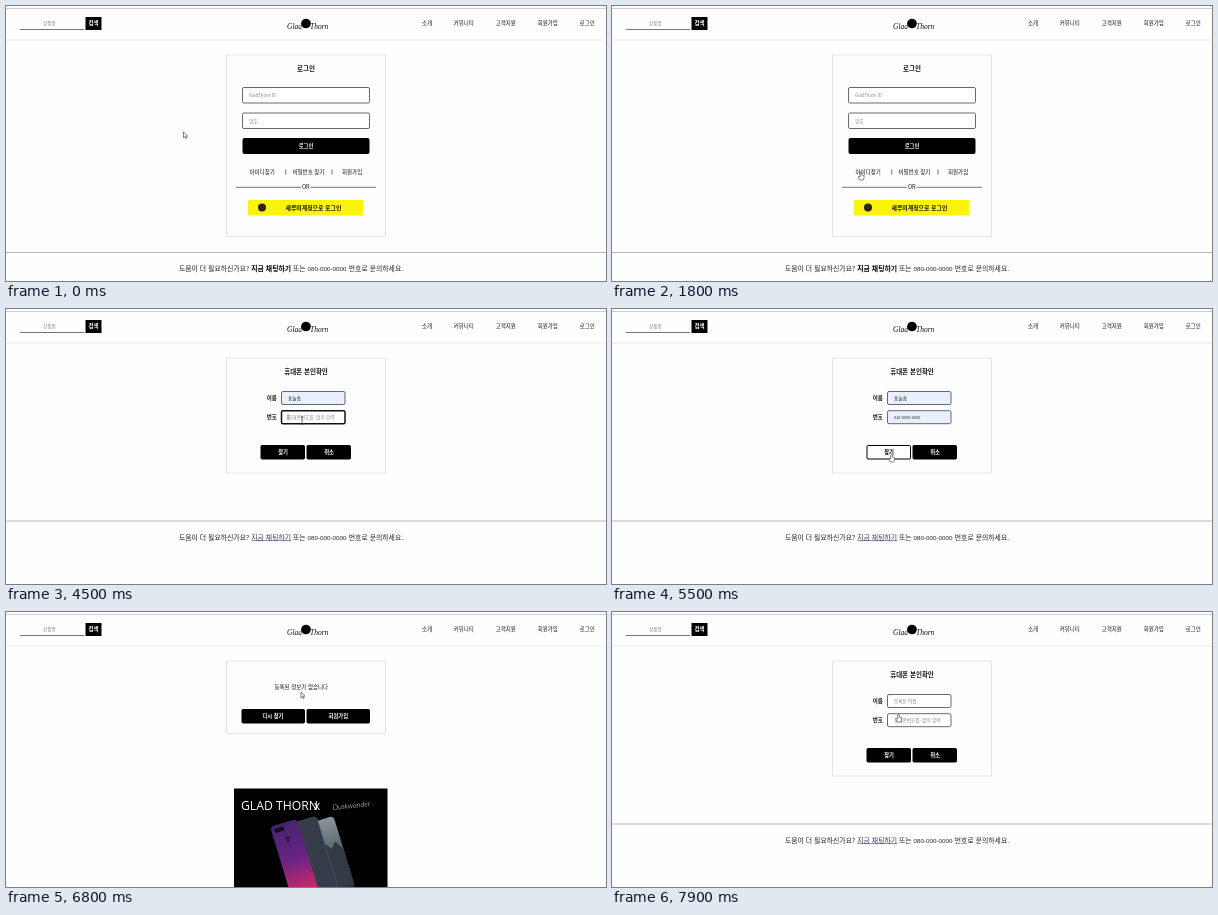
An HTML page for the animation above (8000 ms loop, 600 by 275 pixels).

```html
<!DOCTYPE html>
<html lang="ko">
<head>
<meta charset="utf-8">
<title>Login</title>
<style>
html, body { margin: 0; height: 100%; overflow: hidden; background: #fefefe; }
svg { display: block; width: 100vw; height: 100vh; }
text { font: 500 5.5px "Noto Sans CJK KR", "Noto Sans CJK", "Noto Sans CJK JP", sans-serif; fill: #111; }
.mid { text-anchor: middle; }
.bold { font-weight: 700; }
.title { font-size: 6.5px; font-weight: 700; text-anchor: middle; }
.hint { font-size: 4.6px; font-weight: 400; fill: #858585; }
.value { font-size: 4.7px; font-weight: 400; fill: #222; }
.help text { font-size: 6.87px; font-weight: 400; fill: #222; }
.help .num { font-family: "Liberation Sans", Arial, sans-serif; font-size: 6.26px; }
.logo { font: italic 7.5px "Liberation Serif", serif; }
.card { fill: #fdfdfd; stroke: #dedee2; stroke-width: .8; }
.field { fill: #fff; stroke: #444; stroke-width: .8; }
.field.filled { fill: #e8f0fe; }
.field.focus { stroke: #111; stroke-width: 1.5; }
.btn rect { fill: #000; stroke: #000; }
.btn text { fill: #fff; font-size: 5.3px; text-anchor: middle; font-weight: 700; }
.btn.hover rect { fill: #fff; }
.btn.hover text { fill: #000; }
.ad text { fill: #fff; }
.pointer { fill: #fff; stroke: #333; stroke-width: .6; stroke-linejoin: round; }
</style>
</head>
<body>
<svg viewBox="0 0 600 275" preserveAspectRatio="none">
  <defs>
    <linearGradient id="violet" x2="0" y2="1">
      <stop stop-color="#45256f"/><stop offset=".5" stop-color="#6a2385"/><stop offset="1" stop-color="#d62a68"/>
    </linearGradient>
    <linearGradient id="slate" x2="0" y2="1">
      <stop stop-color="#8b9499"/><stop offset=".45" stop-color="#59646c"/><stop offset="1" stop-color="#252b32"/>
    </linearGradient>
  </defs>

  <g id="header">
    <path d="M0 2.5H600" stroke="#d2ccd2"/>
    <path d="M0 34H600" stroke="#ececee"/>
    <path d="M14 23.5H78" stroke="#666" stroke-width=".9"/>
    <text class="hint" x="37" y="19.3" font-size="4.8">상품명</text>
    <rect x="79.5" y="11" width="16" height="13"/>
    <text class="mid bold" x="87.5" y="19.4" style="fill:#fff">검색</text>
    <text class="logo" x="296" y="23" text-anchor="end">Glad</text>
    <circle cx="300" cy="17.5" r="4.8"/>
    <text class="logo" x="304" y="23">Thorn</text>
    <text x="416" y="19.3">소개</text>
    <text x="447.7" y="19.3">커뮤니티</text>
    <text x="489.7" y="19.3">고객지원</text>
    <text x="531.7" y="19.3">회원가입</text>
    <text x="573.7" y="19.3">로그인</text>
  </g>

  <g id="login">
    <rect class="card" x="220.5" y="49" width="159" height="181.5"/>
    <text class="title" x="300" y="65">로그인</text>
    <rect class="field" x="236.5" y="81.5" width="127" height="15.5" rx="1.5"/>
    <text class="hint" x="243" y="91" style="font-size:4.3px">GladThorn ID</text>
    <rect class="field" x="236.5" y="107" width="127" height="15.5" rx="1.5"/>
    <text class="hint" x="243" y="116.5">암호</text>
    <g class="btn"><rect x="237" y="132.5" width="126" height="15" rx="1.2"/><text x="300" y="142">로그인</text></g>
    <text x="243.5" y="168">아이디찾기</text>
    <text x="286.5" y="168">비밀번호 찾기</text>
    <text x="336" y="168">회원가입</text>
    <path d="M279.8 163.5V168.5M326 163.5V168.5" stroke="#333" stroke-width=".7"/>
    <path d="M230 181.3H295M304.5 181.3H370" stroke="#555" stroke-width=".8"/>
    <text class="mid" x="299.8" y="183.2" style="font-weight:400">OR</text>
    <rect x="242" y="194" width="115.5" height="15.5" rx="1.5" fill="#fcf30a"/>
    <circle cx="256" cy="201.5" r="4" fill="#2f2114"/>
    <text class="bold" x="279.5" y="203.7" style="font-size:5.9px">새루미계정으로 로그인</text>
    <path d="M0 246.5H600" stroke="#bcb0bc"/>
    <g class="help">
      <text x="173" y="265">도움이 더 필요하신가요?</text>
      <text x="245.3" y="265" style="font-weight:700;fill:#000">지금 채팅하기</text>
      <text x="287" y="265">또는</text>
      <text class="num" x="301.5" y="265">080-000-0000</text>
      <text x="342.8" y="265">번호로 문의하세요.</text>
    </g>
  </g>

  <g id="form">
    <rect class="card" x="220.5" y="49" width="159" height="115"/>
    <text class="title" x="300" y="65">휴대폰 본인확인</text>
    <text class="bold" x="260.8" y="91">이름</text>
    <rect class="field" id="nameBox" x="275.5" y="82.5" width="63.5" height="13" rx="1.5"/>
    <text id="name" x="282" y="90.8"></text>
    <text class="bold" x="260.8" y="109.8">번호</text>
    <rect class="field" id="phoneBox" x="275.5" y="101.7" width="63.5" height="13" rx="1.5"/>
    <text id="phone" x="282" y="109.8"></text>
    <path id="caret" d="M282 105.3V111" stroke="#111" stroke-width=".6"/>
    <g class="btn" id="find"><rect x="255" y="136.5" width="43.5" height="13.5" rx="1"/><text x="277" y="145.2">찾기</text></g>
    <g class="btn"><rect x="301" y="136.5" width="43.5" height="13.5" rx="1"/><text x="323" y="145.2">취소</text></g>
    <path d="M0 212H600" stroke="#bbb" stroke-width="1.2"/>
    <g class="help">
      <text x="173" y="230.5">도움이 더 필요하신가요?</text>
      <text x="245.3" y="230.5" style="fill:#3a3468">지금 채팅하기</text>
      <path d="M245.3 231.6H285" stroke="#3a3468" stroke-width=".6"/>
      <text x="287" y="230.5">또는</text>
      <text class="num" x="301.5" y="230.5">080-000-0000</text>
      <text x="342.8" y="230.5">번호로 문의하세요.</text>
    </g>
  </g>

  <g id="result">
    <rect class="card" x="220.5" y="49" width="159" height="72.5"/>
    <text class="mid" x="295.3" y="76.5">등록된 정보가 없습니다</text>
    <g class="btn" id="again"><rect x="236" y="97.5" width="62.5" height="13.5" rx="1"/><text x="267" y="106.2">다시 찾기</text></g>
    <g class="btn"><rect x="301" y="97.5" width="62.5" height="13.5" rx="1"/><text x="332.3" y="106.2">회원가입</text></g>
    <g class="ad">
      <rect x="228" y="176.5" width="153.5" height="99"/>
      <text x="235" y="197.7" style="font:400 12.2px 'Open Sans',sans-serif">GLAD THORN</text>
      <text x="311" y="197.7" class="mid" style="font:400 12.5px 'Open Sans',sans-serif">x</text>
      <text x="327" y="198" transform="rotate(-6 327 198)" style="font:italic 300 7.4px Lato,sans-serif">Duskwander</text>
      <g transform="translate(314 208) rotate(-17)">
        <rect x="-13" y="0" width="27" height="75" rx="4" fill="url(#slate)"/>
        <path d="M-13 36L-4 22 3 31 8 25 14 34V71H-13Z" fill="#323b43"/>
      </g>
      <rect x="-12" width="25" height="75" rx="4" fill="#343d49" stroke="#59636e" stroke-width=".5" transform="translate(298 208) rotate(-17)"/>
      <g transform="translate(277 211) rotate(-17)">
        <rect x="-13.5" width="28" height="75" rx="4" fill="url(#violet)"/>
        <rect x="-10.5" y="3" width="10" height="4.5" rx="2.2" fill="#150d22"/>
        <circle cx="0" cy="17" r="2.6" fill="#2c1748"/>
      </g>
    </g>
  </g>

  <g id="cursor">
    <path class="pointer" id="arrow" d="M0 0V5.8L1.4 4.6 2.3 6.6 3.2 6.2 2.3 4.2H4Z"/>
    <path class="pointer" id="hand" d="M-.8 .7Q0 -.4 .8 .7V3L3 3.6V6L2.2 8H-1.2L-2.9 4.9Q-2 4 -.8 5Z"/>
    <path id="beam" d="M-1.2 0H1.2M0 0V7M-1.2 7H1.2" stroke="#333" stroke-width=".7"/>
  </g>
</svg>

<script>
const $ = id => document.getElementById(id);
const LOOP = 8000, STEP = 100;

// time, x, y, pointer shape from then on
const path = [
  [0, 177.5, 126, 'arrow'], [900, 200, 140, 'arrow'], [1600, 246, 165, 'hand'],
  [1800, 249, 166, 'hand'], [2000, 252, 163, 'arrow'], [2300, 287, 88, 'beam'],
  [2600, 290.5, 101, 'arrow'], [2800, 290.5, 101, 'arrow'], [3100, 290, 111, 'arrow'],
  [4000, 290, 111, 'arrow'], [4300, 296, 108, 'beam'], [4500, 296, 108, 'beam'],
  [4800, 296, 120, 'arrow'], [5000, 295, 121, 'arrow'], [5300, 281, 143, 'hand'],
  [5500, 279.5, 145, 'hand'], [5700, 279.5, 145, 'arrow'], [6000, 285, 110, 'hand'],
  [6200, 289, 96, 'arrow'], [6600, 295, 80, 'arrow'], [6900, 295, 80, 'arrow'],
  [7200, 288, 98, 'hand'], [7400, 286.5, 102, 'hand'], [8000, 286.5, 102, 'hand']
];

const show = (id, on) => $(id).style.display = on ? '' : 'none';
const within = (t, a, b) => t >= a && t < b;

function moveCursor(t) {
  const i = path.findLastIndex(k => k[0] <= t);
  const [t0, x0, y0, shape] = path[i], [t1, x1, y1] = path[i + 1];
  const p = (t - t0) / (t1 - t0);
  $('cursor').setAttribute('transform', `translate(${x0 + (x1 - x0) * p} ${y0 + (y1 - y0) * p})`);
  for (const s of ['arrow', 'hand', 'beam']) show(s, s === shape);
}

function setField(id, value, hint, focus) {
  $(id).textContent = value || hint;
  $(id).setAttribute('class', value ? 'value' : 'hint');
  $(id + 'Box').classList.toggle('filled', !!value);
  $(id + 'Box').classList.toggle('focus', focus);
}

function draw(t) {
  const page = t < 2000 ? 'login' : within(t, 5600, 7700) ? 'result' : 'form';
  for (const p of ['login', 'form', 'result']) show(p, p === page);

  const name = within(t, 2600, 3100) ? '표다을' : within(t, 3100, 5600) ? '표늘솜' : '';
  const phone = within(t, 4800, 5600) ? '010-0000-0000' : '';
  setField('name', name, '등록된 이름', within(t, 2300, 4400));
  setField('phone', phone, '휴대폰번호를 -없이 입력', within(t, 4400, 5400));
  $('phone').style.fontSize = phone ? '3.9px' : '';
  show('caret', within(t, 4400, 4800));

  $('find').classList.toggle('hover', within(t, 5300, 5600));
  $('again').classList.toggle('hover', within(t, 6000, 6200) || within(t, 7200, 7700));
  moveCursor(t);
}

const start = performance.now();
function tick(now) {
  const t = Math.max(0, now - start) % LOOP;
  draw(Math.floor(t / STEP) * STEP);
  requestAnimationFrame(tick);
}
draw(0);
requestAnimationFrame(tick);
</script>
</body>
</html>
```
